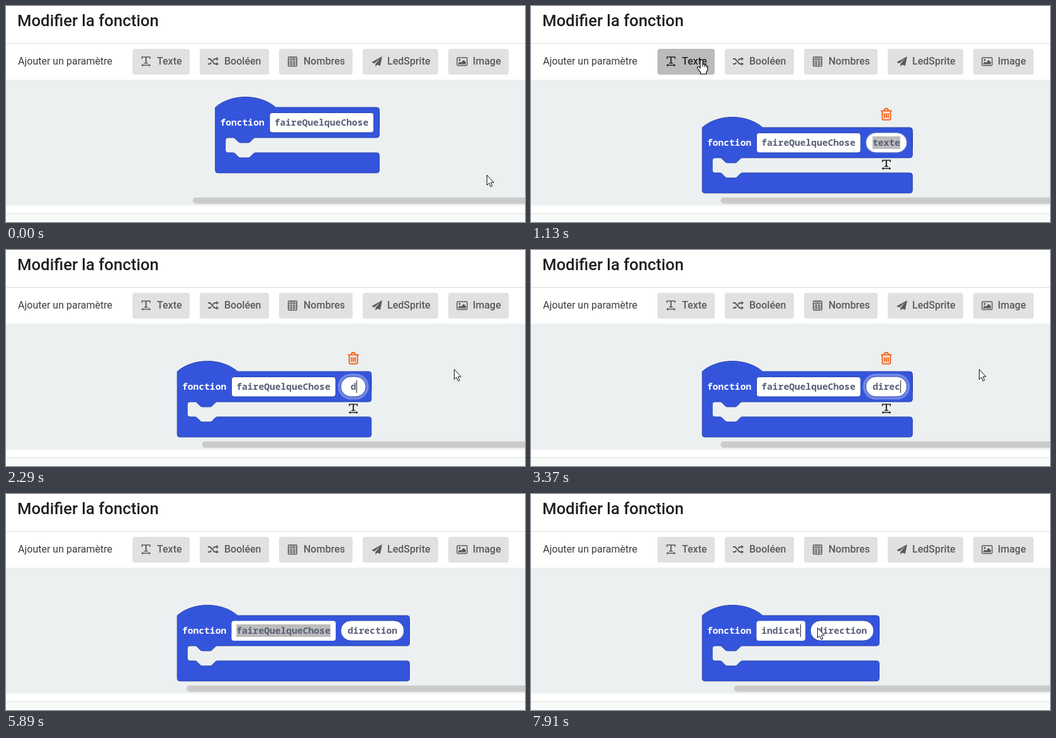
These frames come from a looping animation (825 by 343 pixels, 8000 ms). An HTML page:

```html
<!DOCTYPE html>
<html lang="fr">
<head>
<meta charset="utf-8">
<title>Modifier la fonction</title>
<style>
  html, body { margin: 0; width: 100%; height: 100%; overflow: hidden; background: #fff; }
  svg { display: block; }
  text { font: 16px Roboto, sans-serif; white-space: pre; }
  .title { font-size: 25.7px; font-weight: 500; fill: #1f1f1f; }
  .btn { fill: #5a5a5b; color: #5a5a5b; }
  .btn rect.bg { fill: #e0e1e2; }
  .btn text { font-weight: 500; }
  .btn.hover, .btn.press { fill: #262626; color: #262626; }
  .btn.hover rect.bg { fill: #cacbcd; }
  .btn.press rect.bg { fill: #babbbc; }
  .line { fill: none; stroke: currentColor; stroke-width: 1.5; }
  .code { font: 600 14.667px "Noto Sans Mono", "DejaVu Sans Mono", monospace; fill: #575e75; }
  .keyword { font-weight: 700; fill: #fff; }
  .field { fill: #fff; stroke: #2a44af; }
</style>
</head>
<body>
<svg width="825" height="343" viewBox="0 0 825 343">
  <defs>
    <g id="text-icon">
      <path class="line" d="M-6.3 -4V-7H6.3V-4M-3 2.7H3M-6 6H6"/>
      <path class="line" style="stroke-width:2" d="M0 -7V2.5"/>
      <path d="M-7.5 6L-4.5 3.8V8.2ZM7.5 6L4.5 3.8V8.2Z"/>
    </g>
    <g id="shuffle-icon">
      <path class="line" style="stroke-width:2" d="M-8.5 -4H-5L2 4H6M-8.5 4H-5L-3.2 2M-.4 -1.3L2 -4H6"/>
      <path d="M5 -7L8.7 -4L5 -1ZM5 1L8.7 4L5 7Z"/>
    </g>
    <g id="calc-icon">
      <rect class="line" x="-6.8" y="-7" width="13.6" height="14.4" rx="1"/>
      <path class="line" style="stroke-width:1.2" d="M-6.5 -2.6H6.5M-6.5 .8H6.5M-6.5 4.1H6.5M-2.3 -2.6V7M2.3 -2.6V7M-4.5 -4.8H4.5"/>
    </g>
    <path id="plane-icon" d="M8.4 -8L-8.3 1.2L-4.2 3.2L5.2 -5L-2.2 4V8L.8 5.2L5.4 7Z"/>
    <g id="image-icon">
      <rect class="line" x="-8" y="-6" width="16" height="12.4" rx="1.5"/>
      <circle cx="-4" cy="-2.4" r="1.6"/>
      <path d="M-6 4.5V2.5L-3.5 .3L-1.8 2L2.5 -2.6L6 .9V4.5Z"/>
    </g>
  </defs>

  <text class="title" x="18" y="32">Modifier la fonction</text>
  <rect y="59" width="825" height="1" fill="#dcdddd"/>
  <text x="19" y="93" fill="#3c3c3c">Ajouter un paramètre</text>
  <g id="buttons"></g>
  <rect y="117" width="825" height="200" fill="#ecf0f1"/>
  <rect y="329" width="825" height="14" fill="#f9fafa"/>
  <rect y="329" width="825" height="1" fill="#dcdddd"/>
  <rect id="scroll" y="304" width="600" height="10" rx="5" fill="#cbcbcb"/>

  <g id="block">
    <path id="shell" fill="#3455db" stroke="#2a44af"/>
    <path id="edge" stroke="#1d3194" fill="none"/>
    <text class="code keyword" x="7.7" y="29">fonction</text>
    <rect id="nameBox" class="field" x="86.3" y="8.5" height="31.5" rx="4"/>
    <rect id="nameSel" x="94" y="14" height="20" fill="#bcbcbc"/>
    <text id="name" class="code" x="94" y="29"></text>
    <g id="param">
      <rect id="ring" fill="#fff" fill-opacity=".3"/>
      <rect id="oval" class="field" y="8" height="32" rx="16"/>
      <rect id="paramSel" y="14" height="20" fill="#bcbcbc"/>
      <text id="paramText" class="code" y="29" text-anchor="middle"></text>
      <g id="tools">
        <path fill="none" stroke="#f9641e" stroke-width="2" stroke-linejoin="round" stroke-linecap="round"
          d="M-8 -26.5H8M-3.5 -27L-2 -30H2L3.5 -27M-6.5 -26V-14.5Q-6.5 -12.2 -4.2 -12.2H4.2Q6.5 -12.2 6.5 -14.5V-26M-2.9 -22V-16M0 -22V-16M2.9 -22V-16"/>
        <use href="#text-icon" y="59" fill="#222" color="#222"/>
      </g>
    </g>
    <rect id="caret" y="14" width="1" height="20" fill="#222"/>
  </g>

  <g id="cursor" stroke="#111" fill="#fff" stroke-linejoin="round">
    <path id="arrow" d="M.5 .5V16.5L4 13.2L6.5 19L9 17.9L6.5 12.2H11.3Z"/>
    <path id="hand" stroke-width="1.2" d="M-2 1.4A2 2 0 0 1 2 1.4V6.8A1.9 1.9 0 0 1 5.3 7.6A1.8 1.8 0 0 1 8 8.9A1.4 1.4 0 0 1 9.8 10.3V15.5L7.6 19.3V22H-1.4V19.6L-6.3 12.8C-7.6 10.6 -5 9.5 -3.6 11L-2 12.8ZM2 7V10.5M5.3 8V11M8 9V11.5"/>
    <path id="beam" fill="none" d="M-2 -6.5H1.5M2.5 -6.5H6M2 -6V8M-2 8.5H1.5M2.5 8.5H6"/>
  </g>
</svg>
<script>
const LOOP = 8000, CHAR = 8.8, STEP = 76;
const ADD = 980, EDIT_NAME = 5590;
const $ = id => document.getElementById(id);
const set = (id, attrs) => { for (const k in attrs) $(id).setAttribute(k, attrs[k]); };
const show = (id, on) => set(id, { visibility: on ? 'visible' : 'hidden' });

const BUTTONS = [
  ['Texte', 201, 91, 'text', 222.5, 240],
  ['Booléen', 308, 110, 'shuffle', 329.5, 347],
  ['Nombres', 434, 117, 'calc', 455.5, 473],
  ['LedSprite', 567, 120, 'plane', 589.5, 606],
  ['Image', 703, 96, 'image', 725, 742]
];
$('buttons').innerHTML = BUTTONS.map(([label, x, w, icon, ix, tx]) => `<g class="btn">
  <rect class="bg" x="${x}" y="68" width="${w}" height="41" rx="4"/>
  <use href="#${icon}-icon" x="${ix}" y="88"/><text x="${tx}" y="93">${label}</text></g>`).join('');
const textButton = $('buttons').firstElementChild;

// Typing: [time, number of letters]
const PARAM_KEYS = [[2290, 1], [2590, 2], [2830, 3], [3080, 4], [3370, 5], [3690, 6], [4090, 8], [4480, 9]];
const NAME_KEYS = [[6520, 1], [6750, 2], [7070, 3], [7220, 4], [7450, 5], [7680, 6], [7910, 7]];

// Pointer: [time, x, y]
const PATH = [
  [64, 764, 268], [300, 640, 215], [600, 400, 135], [748, 300, 112], [824, 276, 92], [900, 271, 86],
  [1128, 271, 86], [1280, 300, 112], [1432, 430, 158], [1584, 590, 190], [1736, 681, 194], [1812, 712, 189],
  [4784, 712, 189], [4860, 675, 200], [5088, 509, 235], [5240, 468, 222], [5392, 455, 212]
];

function typed(t, keys, word, before) {
  const key = keys.filter(k => k[0] <= t).pop();
  return key ? { text: word.slice(0, key[1]), at: key[0] } : { text: before, at: null };
}

function pointer(t) {
  const base = t < 4860 ? 140 : 4860;
  const q = base + Math.floor((t - base) / STEP) * STEP;
  const i = PATH.findIndex(p => p[0] > q);
  if (i < 0) return PATH[PATH.length - 1].slice(1);
  const a = PATH[Math.max(i - 1, 0)], b = PATH[i];
  const p = Math.max(0, (q - a[0]) / (b[0] - a[0]));
  return [a[1] + (b[1] - a[1]) * p, a[2] + (b[2] - a[2]) * p].map(Math.round);
}

// Hat, header, inner mouth with two notches, lower arm
function shell(w) {
  return `M0 0c25 -22 71 -22 96 0H${w - 4}a4 4 0 0 1 4 4V44a4 4 0 0 1 -4 4H64
    c-2 0 -3 1 -4 2l-4 4c-1 1 -2 2 -4 2h-12c-2 0 -3 -1 -4 -2l-4 -4c-1 -1 -2 -2 -4 -2h-8a4 4 0 0 0 -4 4v16a4 4 0 0 0 4 4h8
    c2 0 3 1 4 2l4 4c1 1 2 2 4 2h12c2 0 3 -1 4 -2l4 -4c1 -1 2 -2 4 -2H${w - 4}a4 4 0 0 1 4 4v24a4 4 0 0 1 -4 4H4a4 4 0 0 1 -4 -4Z`;
}

function drawBlock(t) {
  const added = t >= ADD, editName = t >= EDIT_NAME, editParam = added && !editName;
  const name = typed(t, NAME_KEYS, 'indicateur', 'faireQuelqueChose');
  const param = typed(t, PARAM_KEYS, 'direction', 'texte');
  const nameW = name.text.length * CHAR + 16;
  const ovalX = 86.3 + nameW + 8;
  const ovalW = Math.max(40, param.text.length * CHAR + 21.6);
  const mid = ovalX + ovalW / 2;
  const width = added ? ovalX + ovalW + 8.6 : 86.3 + nameW + 8.8;
  const left = added ? 272.2 : 332.7, top = added ? 193 : 161;

  set('block', { transform: `translate(${left} ${top})` });
  set('shell', { d: shell(width) });
  set('edge', { d: `M${width} 8V31` });
  set('scroll', { x: added ? 301.5 + (606 - left - width) * .405 : 297 });

  set('nameBox', { width: nameW, 'stroke-opacity': editName ? 0 : 1 });
  set('nameSel', { width: name.text.length * CHAR });
  show('nameSel', editName && name.at === null);
  $('name').textContent = name.text;

  set('param', { display: added ? 'inline' : 'none' });
  set('oval', { x: ovalX, width: ovalW });
  set('paramText', { x: mid });
  $('paramText').textContent = param.text;
  const selW = param.text.length * CHAR;
  set('paramSel', { x: mid - selW / 2, width: selW });
  show('paramSel', editParam && param.at === null);
  const p = Math.min(1, Math.max(0, (t - 1000) / 500));
  const grow = 4.5 * p * p * (3 - 2 * p);
  set('ring', { x: ovalX - grow, y: 8 - grow, width: ovalW + 2 * grow, height: 32 + 2 * grow, rx: 16 + grow });
  show('ring', editParam);
  set('tools', { transform: `translate(${mid} 0)` });
  show('tools', editParam);

  const key = editName ? name.at : param.at;
  const end = editName ? 94 + name.text.length * CHAR : mid + selW / 2;
  set('caret', { x: Math.round(left + end) - left });
  show('caret', key !== null && t - key < 530);
}

function drawPointer(t) {
  const [x, y] = pointer(t);
  const onButton = x > 200 && x < 292 && y > 67 && y < 109;
  const beam = t >= EDIT_NAME && t < 5890;
  const hidden = t >= 5890 && t < 6520;
  set('cursor', { transform: `translate(${x} ${y})` });
  show('arrow', !onButton && !beam && !hidden);
  show('hand', onButton);
  show('beam', beam);
  textButton.setAttribute('class', onButton ? (t < ADD ? 'btn hover' : 'btn press') : 'btn');
}

const start = performance.now();
function tick() {
  const t = (performance.now() - start) % LOOP;
  drawBlock(t);
  drawPointer(t);
  requestAnimationFrame(tick);
}
tick();
</script>
</body>
</html>
```
